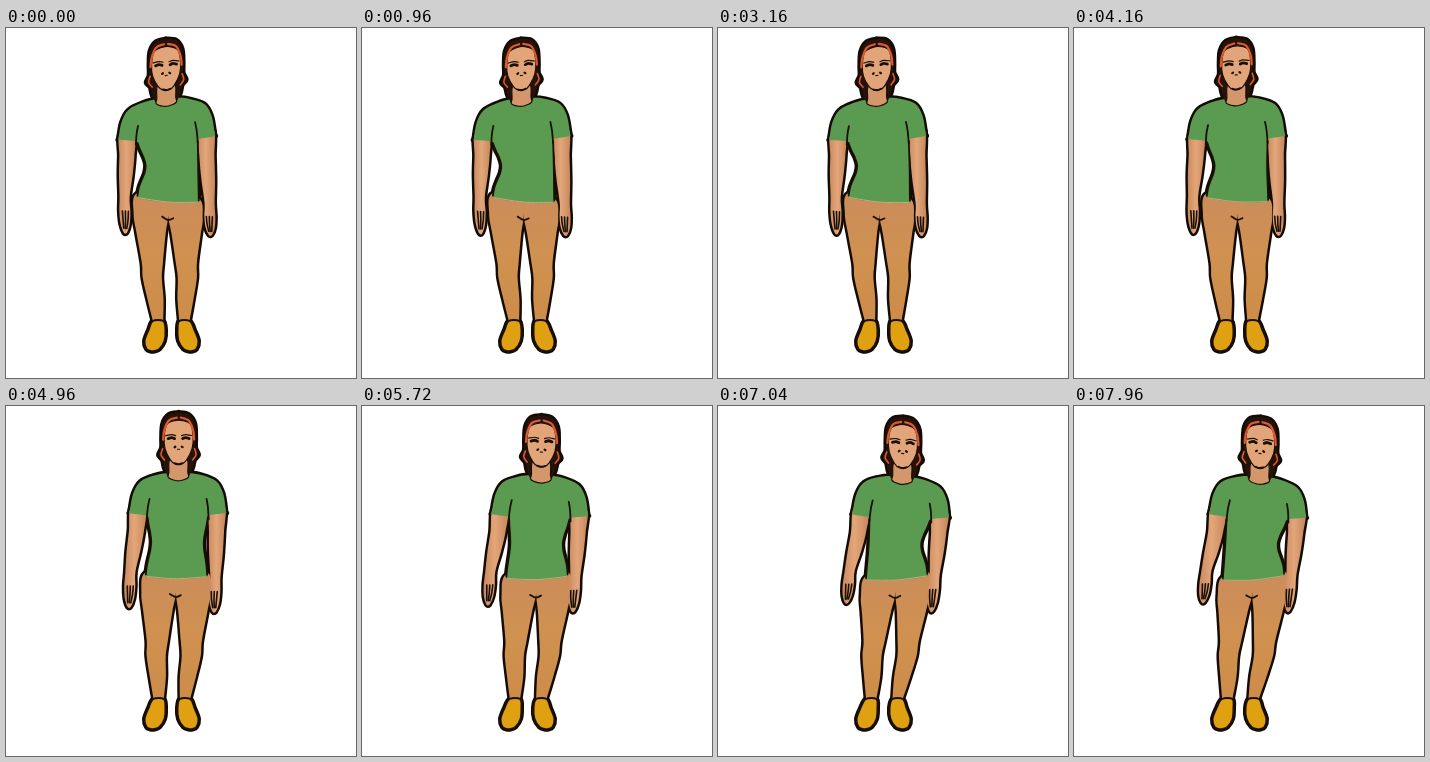
Animation of 350x350 px, one loop 8 s. Source, as an HTML page:

```html
<!DOCTYPE html>
<html lang="en">
<head>
<meta charset="utf-8">
<title>Standing figure</title>
<style>
  html, body { margin: 0; width: 100%; height: 100%; overflow: hidden; background: #fff; }
  svg { display: block; width: 100vw; height: 100vh; }
</style>
</head>
<body>
<svg viewBox="0 0 350 350">
  <defs>
    <linearGradient id="skin">
      <stop offset="0" stop-color="#c98a60"/><stop offset=".45" stop-color="#e3a679"/>
      <stop offset="1" stop-color="#c5865c"/>
    </linearGradient>
    <linearGradient id="cloth" x2="0" y2="1">
      <stop offset="0" stop-color="#cb8c5c"/><stop offset=".5" stop-color="#d09150"/>
      <stop offset="1" stop-color="#cd8c48"/>
    </linearGradient>
  </defs>
  <g id="back" fill="none" stroke="#140c04" stroke-width="5" stroke-linejoin="round"></g>
  <g id="front" stroke-linejoin="round" stroke-linecap="round"></g>
</svg>
<script>
const LOOP = 8000, STEP = 40, INK = '#1a1006', RED = '#dc5a2f', SHIRT = '#5b9a51';
const SIDES = [-1, 1];
const back = document.getElementById('back');
const front = document.getElementById('front');
const shapes = [];
const clamp = (v, lo = 0, hi = 1) => Math.max(lo, Math.min(hi, v));

// Weight shift: 0 = on the left, 1 = on the right.
function leanAt(t) {
  const s = 80 * Math.log(1 + Math.exp((t - 4200) / 80));
  const rest = Math.exp(-s / 1200);
  return 1.03 * (1 - rest) - .05 * Math.sin(2 * Math.PI * t / 2400) * rest;
}

// Puts a point, given as offset from the spine and height, on the stage.
function place(off, y, t) {
  const k = leanAt(t), q = Math.min(1, (y / 300) ** 2);
  const spine = 173.5 - 8 * q + (2 * k - 1) * 13.5 * (1 - q);
  const roll = 3.5 * Math.cos(Math.PI * clamp((y - 80) / 90, 0, 1.5));
  const lift = 4.5 * Math.exp(-(((t - 5050) / 640) ** 2)) * clamp((230 - y) / 190);
  return [spine + off, y - off / 45 * (1 - 2 * k) * roll - lift];
}

// Arms swing and follow the body a little late.
function placeArm(off, y, t) {
  const late = t - Math.max(0, y - 110) * 2;
  const k = leanAt(late), w = clamp((y - 115) / 60);
  const [px, py] = place(off, y, late);
  return [px - (1 + 4 * k) * w, py - (off < 0 ? 11 * k * w : 0)];
}

function add(points, attrs, { open = false, outline = false, map = place } = {}) {
  const els = (outline ? [front, back] : [front]).map(g =>
    g.appendChild(document.createElementNS('http://www.w3.org/2000/svg', 'path')));
  for (const name in attrs) els[0].setAttribute(name, attrs[name]);
  shapes.push({ points, els, open, map });
}

const line = (pts, width, stroke = INK, map = place) =>
  add(() => pts, { fill: 'none', stroke, 'stroke-width': width }, { open: true, map });

const flip = (pts, side) => pts.map(([x, y]) => [x * side, y]);
const whole = half => [...half, ...flip(half, -1).reverse()];

// Rows of [height, inner offset, outer offset] make a limb.
const limb = (rows, side) => flip(
  [...rows.map(r => [r[2], r[0]]), ...rows.map(r => [r[1], r[0]]).reverse()], side);

const LEG = [[168, 0, 31], [188, 0, 34.5], [206, 3, 32], [235, 6.5, 27.5],
             [250, 8, 27], [271, 7, 23], [292, 8, 18.5], [294, 8, 18]];
const SHOE = [[293, 8, 18.5], [302, 6, 23], [313, 7, 27], [321, 12, 25], [323, 17, 21]];
const ARM = [[104, 32, 47], [128, 32.5, 47.5], [150, 34.5, 48], [172, 37.5, 47.5],
             [186, 37, 48], [198, 38, 47], [206, 41, 44]];

// The side without the weight line of the torso pinches at the waist.
function torsoSide(side, t) {
  const k = leanAt(t), bend = side < 0 ? 1 - k : k, pts = [];
  for (let y = 114; y <= 172; y += 8)
    pts.push([side * (31 - 9.5 * bend * Math.exp(-(((y - 139) / 19) ** 2))), y]);
  return pts;
}

const shirtHalf = (side, t) => [
  ...flip([[0, 78], [9, 76], [11, 71], [24, 73], [38, 79], [45, 91], [48, 108], [47.5, 110], [32, 112]], side),
  ...torsoSide(side, t),
  ...flip([[30, 172], [14, 174]], side)
];

for (const side of SIDES)
  add(() => limb(LEG, side), { fill: 'url(#cloth)' }, { outline: true });
line([[-6, 189], [0, 192], [5, 190]], 1.8);
for (const side of SIDES) {
  add(() => limb(SHOE, side), { fill: '#dfa011', stroke: INK, 'stroke-width': 2 }, { outline: true });
  add(() => limb(ARM, side), { fill: 'url(#skin)' }, { outline: true, map: placeArm });
  for (let i = 0; i < 3; i++)
    line(flip([[39 + 3 * i, 186], [39.5 + 2.5 * i, 194], [41 + 1.5 * i, 202]], side), 1.6, INK, placeArm);
}

add(t => [...shirtHalf(1, t), ...shirtHalf(-1, t).reverse()], { fill: SHIRT }, { outline: true });
for (const side of SIDES) {
  add(t => torsoSide(side, t), { fill: 'none', stroke: INK, 'stroke-width': 1.8 }, { open: true });
  line(flip([[28.5, 96], [30, 104], [31, 116]], side), 1.8);
}
line([[-29, 172], [0, 174], [29, 172]], 1, '#bfae78');

// head
add(() => whole([[0, 11], [10, 13], [16, 22], [17, 36], [17, 46], [20, 53],
                 [16, 58], [14, 66], [9, 76], [7, 64]]), { fill: '#25120a' }, { outline: true });
add(() => whole([[8, 56], [9.5, 70], [10, 75], [3, 78]]),
  { fill: '#d4966b', stroke: INK, 'stroke-width': 1.2 });
add(() => whole([[4, 19], [12, 23], [14.5, 35], [13.5, 47], [8, 58], [3, 62]]),
  { fill: '#e2a579', stroke: INK, 'stroke-width': 1.2 });
for (const side of SIDES) {
  line(flip([[2, 16], [10, 19], [14.5, 29], [15.5, 38]], side), 2.2, RED);
  line(flip([[16, 47], [17.5, 53], [14, 58]], side), 1.6, RED);
  line(flip([[3, 34], [7, 33], [13, 34]], side), 1.2);
  line(flip([[4, 37], [7, 36], [10.5, 37]], side), 2.8);
  line(flip([[3.2, 45], [4, 45.5]], side), 2.2);
}
line([[-1, 47.5], [1, 47.5]], 1.2);
line([[-4, 61], [0, 62], [4, 61]], 1.8);

// Catmull-Rom spline written as cubic segments.
function curve(pts, open) {
  const n = pts.length;
  const at = i => open ? pts[clamp(i, 0, n - 1)] : pts[(i + n) % n];
  let d = 'M' + pts[0];
  for (let i = 0; i < n - (open ? 1 : 0); i++) {
    const [p, a, b, q] = [at(i - 1), at(i), at(i + 1), at(i + 2)];
    d += 'C' + [a[0] + (b[0] - p[0]) / 6, a[1] + (b[1] - p[1]) / 6,
                b[0] - (q[0] - a[0]) / 6, b[1] - (q[1] - a[1]) / 6, ...b].map(v => v.toFixed(2));
  }
  return open ? d : d + 'Z';
}

function draw(t) {
  for (const { points, els, open, map } of shapes) {
    const d = curve(points(t).map(([off, y]) => map(off, y, t)), open);
    for (const el of els) el.setAttribute('d', d);
  }
}

const start = performance.now();
function tick() {
  const t = (performance.now() - start) % LOOP;
  draw(Math.floor(t / STEP) * STEP);
  requestAnimationFrame(tick);
}
tick();
</script>
</body>
</html>
```
